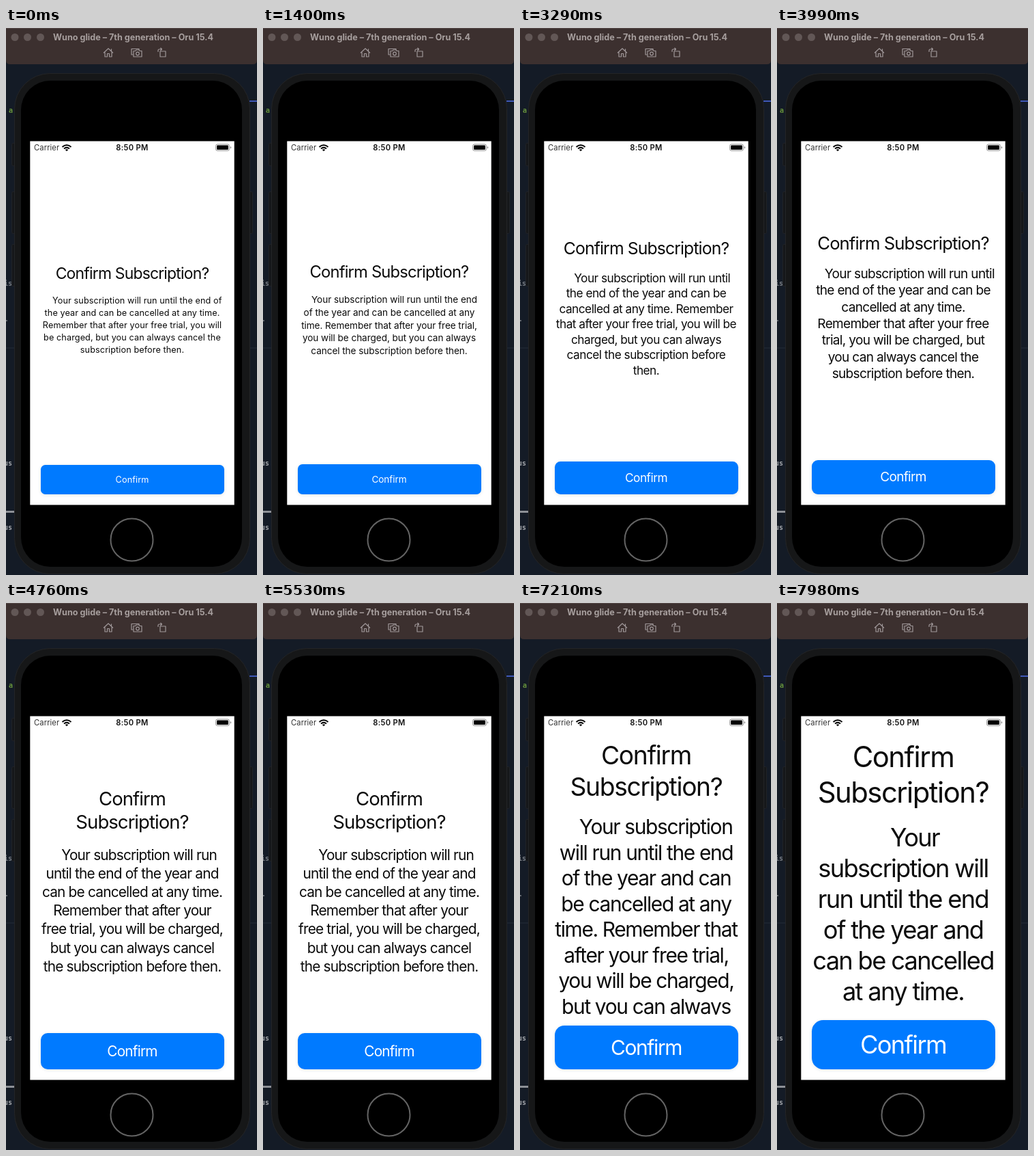
Recreate the animation shown at these times as an HTML page. Size 368 by 800 pixels, loop 8 s.

```html
<!DOCTYPE html>
<html lang="en">
<head>
<meta charset="utf-8">
<title>Confirm Subscription</title>
<style>
  html, body { margin: 0; width: 100%; height: 100%; overflow: hidden; background: #141b26; }
  body { font-family: Inter, "Open Sans", sans-serif; font-optical-sizing: none; }
  #stage { position: relative; width: 368px; height: 800px; overflow: hidden; }
  svg { position: absolute; inset: 0; }
  .code { font: 600 10px "DejaVu Sans Mono", monospace; }
  .status { font-size: 11.2px; letter-spacing: .1px; }
  #screen {
    position: absolute; left: 35px; top: 184px; width: 300px; height: 513.5px;
    color: #0b0b0b; text-align: center; white-space: pre-wrap;
    font-size: var(--size); line-height: var(--line); letter-spacing: var(--track);
  }
  .view {
    position: absolute; left: 14.5px; right: 14.5px; top: 15px; bottom: calc(31.5px + var(--button));
    overflow: hidden; display: flex; flex-direction: column;
  }
  .copy { position: relative; top: 1.3px; margin: auto 0; }
  h1 {
    margin: 0 0 17.2px; padding: 0 2px; font-weight: 400;
    font-size: var(--head); line-height: 1.236; letter-spacing: -.035em;
  }
  p { margin: 0; }
  .button {
    position: absolute; left: 15.5px; right: 15.5px; bottom: 15.3px; height: var(--button);
    line-height: var(--button); border-radius: calc(var(--line) * .37);
    background: #007aff; color: #fff; box-shadow: 0 1px 5px rgba(0, 0, 0, .1);
  }
</style>
</head>
<body>
<div id="stage">
  <svg width="368" height="800" viewBox="0 0 368 800">
    <rect width="368" height="800" fill="#141b26"/>
    <path d="M0 468H12M357 468H368" stroke="#252d38"/>
    <path d="M357 107H368" stroke="#3f58b8" stroke-width="2"/>
    <path d="M0 707.5H12" stroke="#8d9096" stroke-width="3"/>
    <g class="code">
      <text x="4" y="124" fill="#67943c">a</text>
      <text x="-3" y="377" fill="#777c83">is</text>
      <text x="-2" y="429" fill="#777c83">.</text>
      <text x="-3" y="640" fill="#a1a4a9">us</text>
      <text x="-3" y="734" fill="#a1a4a9">us</text>
    </g>

    <g fill="#15171a" stroke="#212327">
      <rect x="8.5" y="168.5" width="6" height="33" rx="2"/>
      <rect x="8.5" y="239.5" width="6" height="61" rx="2"/>
      <rect x="8.5" y="316.5" width="6" height="61" rx="2"/>
      <rect x="355.5" y="239.5" width="6" height="61" rx="2"/>
    </g>
    <rect x="12.5" y="66.5" width="345" height="732" rx="52" fill="#161718" stroke="#242527"/>
    <rect x="22" y="77" width="324" height="711" rx="43"/>
    <circle cx="184.5" cy="748.5" r="31" fill="none" stroke="#646464" stroke-width="2"/>

    <path d="M0 0H368V47Q368 53 362 53H6Q0 53 0 47Z" fill="#3c302f"/>
    <path d="M0 .5H368" stroke="#544847"/>
    <g fill="#625756">
      <circle cx="13" cy="13.5" r="5.5"/>
      <circle cx="31.5" cy="13.5" r="5.5"/>
      <circle cx="50.5" cy="13.5" r="5.5"/>
    </g>
    <text x="69" y="17.5" font-size="12.6" font-weight="700" fill="#a79f9e">Wuno glide – 7th generation – Oru 15.4</text>
    <g fill="none" stroke="#a0989a" stroke-width="1.2" stroke-linejoin="round">
      <path d="M143 36.5L150 30L157 36.5M145 35.5V42H148.5V37.5H151.5V42H155V35.5M154.5 33.5V30.5"/>
      <path d="M186.5 39H184V30.5H195V32"/>
      <path d="M187 33.5H190L191 32H195L196 33.5H199V42H187Z"/>
      <circle cx="193" cy="37.5" r="2.3"/>
      <path d="M226 34H234V42H226ZM223 35V33Q223 31 225 31H228M226.5 29L228.5 31L226.5 33"/>
    </g>

    <rect x="35.3" y="165.5" width="299.4" height="532" fill="#fff"/>
    <g class="status">
      <text x="41" y="179.2" fill="#333">Carrier</text>
      <text x="185" y="179.2" text-anchor="middle" font-weight="600" letter-spacing=".3" fill="#111">8:50 PM</text>
    </g>
    <g fill="none" stroke="#000" stroke-width="2">
      <path d="M82.5 174Q89 168.5 95.5 174"/>
      <path d="M85 176.6Q89 173.2 93 176.6"/>
    </g>
    <path d="M89 180.3L86.8 178Q89 176.3 91.2 178Z"/>
    <rect x="307.5" y="170" width="20" height="9.5" rx="2.6" fill="none" stroke="#888" stroke-width=".9"/>
    <rect x="309" y="171.5" width="17" height="6.5" rx="1.3"/>
    <path d="M328.8 173V176.5Q330.3 176 330.3 174.75T328.8 173Z" fill="#888"/>
  </svg>
  <div id="screen"><div class="view"><div class="copy"><h1>Confirm Subscription?</h1><p>    Your subscription will run until the end of the year and can be cancelled at any time. Remember that after your free trial, you will be charged, but you can always cancel the subscription before then.</p></div></div><div class="button">Confirm</div></div>
</div>
<script>
  const LOOP = 8000;
  const PT = 300 / 320;   // screen pixels per point
  const GLYPH = 0.967;    // matches Inter's taller letters to the system font
  const screenEl = document.getElementById("screen");

  // text size steps: start ms, body pt, heading pt
  const steps = [
    [0, 14, 25.3], [910, 15, 26.2], [1680, 16, 26.2], [2310, 17, 26.2], [3220, 19, 27.3],
    [3780, 21, 28.3], [4690, 23, 30.4], [5810, 28, 36.2], [6790, 33, 41], [7490, 40, 46.1]
  ];

  function setSize([, body, head]) {
    const line = Math.floor(body * 1.113 + 3.5) * PT;
    const vars = {
      size: body * PT * GLYPH + "px",
      line: line + "px",
      head: head * PT * GLYPH + "px",
      track: 0.052 * Math.exp((14 - body) / 4.5) - 0.046 + "em",
      button: line * 1.06 + 24.4 + "px"
    };
    for (const k in vars) screenEl.style.setProperty("--" + k, vars[k]);
  }

  const begin = performance.now();
  let shown;

  function draw(now) {
    const t = Math.max(0, now - begin) % LOOP;
    const step = steps.findLast(s => s[0] <= t);
    if (step !== shown) setSize(shown = step);
    requestAnimationFrame(draw);
  }
  draw(begin);
</script>
</body>
</html>
```
